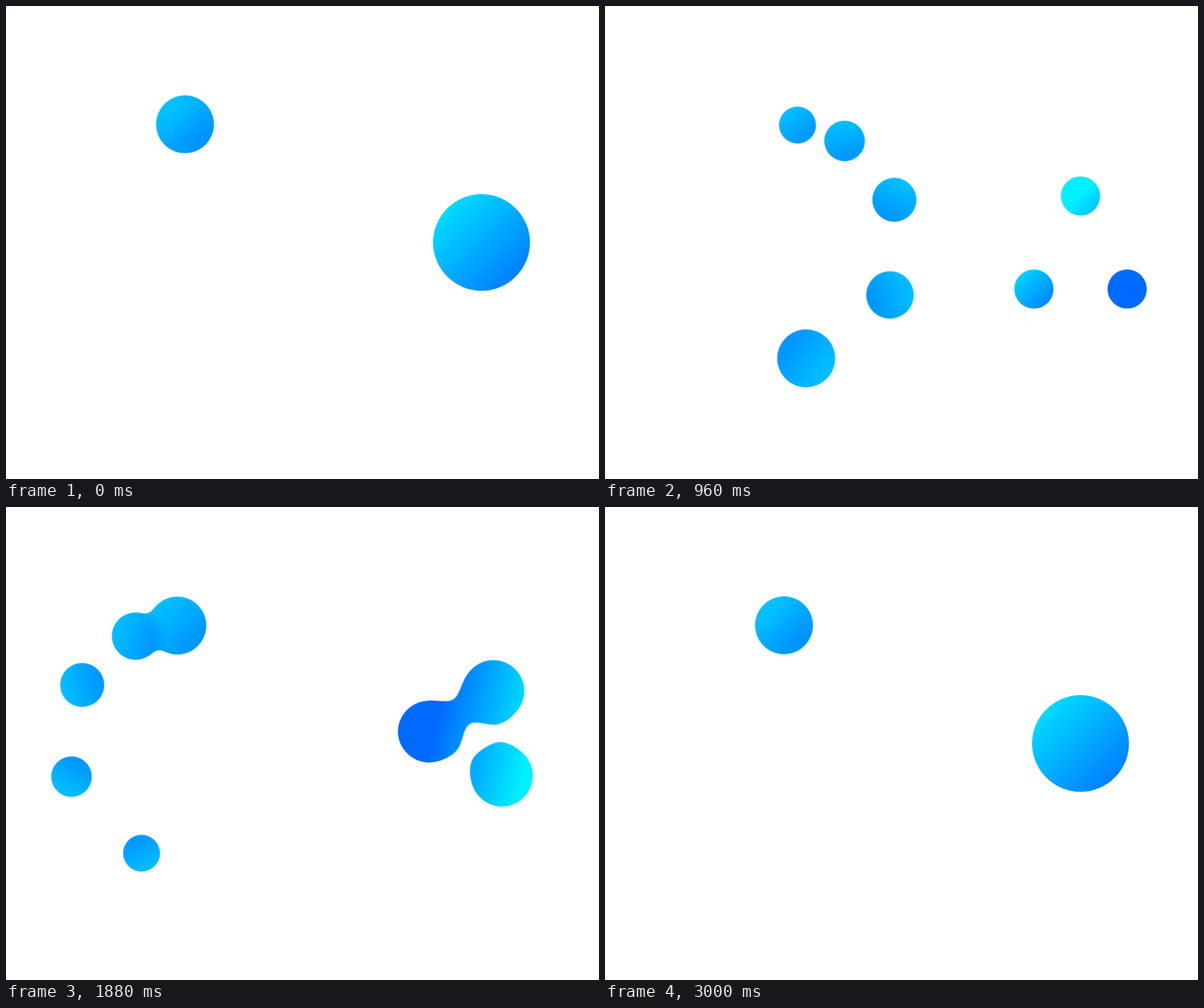
An HTML page that plays this animation: 837 px wide and 669 px high, repeating every 3040 ms.

```html
<!DOCTYPE html>
<html lang="en">
<head>
<meta charset="utf-8">
<title>Gooey loaders</title>
<style>
  html, body { margin: 0; width: 100%; height: 100%; overflow: hidden; background: #fff; }
  svg { display: block; width: 837px; height: 669px; }
</style>
</head>
<body>
<svg viewBox="0 0 837 669">
  <defs>
    <linearGradient id="ballFill" x1="0" y1="0" x2="1" y2="1">
      <stop offset="0" stop-color="#00ceff"/>
      <stop offset="1" stop-color="#0086ff"/>
    </linearGradient>
    <linearGradient id="blobFill" gradientUnits="userSpaceOnUse" x1="-71" y1="-71" x2="71" y2="71">
      <stop offset="0" stop-color="#00f0ff"/>
      <stop offset="1" stop-color="#006aff"/>
    </linearGradient>
    <filter id="softGoo" filterUnits="userSpaceOnUse" x="0" y="0" width="837" height="669" color-interpolation-filters="sRGB">
      <feGaussianBlur stdDeviation="7"/>
      <feColorMatrix values="1 0 0 0 0  0 1 0 0 0  0 0 1 0 0  0 0 0 10 -4.5"/>
    </filter>
    <filter id="hardGoo" filterUnits="userSpaceOnUse" x="420" y="80" width="500" height="500" color-interpolation-filters="sRGB">
      <feGaussianBlur stdDeviation="20"/>
      <feColorMatrix values="1 0 0 0 0  0 1 0 0 0  0 0 1 0 0  0 0 0 40 -19.5"/>
    </filter>
    <mask id="blobMask" maskUnits="userSpaceOnUse" x="420" y="80" width="417" height="500">
      <g filter="url(#hardGoo)">
        <g id="blobs" fill="#fff"><circle/><circle/><circle/></g>
      </g>
    </mask>
  </defs>

  <g id="balls" filter="url(#softGoo)" fill="url(#ballFill)">
    <circle r="41.5"/><circle r="34.2"/><circle r="31.8"/><circle r="29.4"/><circle r="26.9"/>
  </g>

  <g mask="url(#blobMask)">
    <rect id="paint" x="-500" y="-500" width="1000" height="1000" fill="url(#blobFill)"/>
  </g>
</svg>
<script>
  const LOOP = 3040, STEP = 40;
  const ORBIT = 167, BALL_DELAY = 200, TURN = 2000, SPLIT = 1000;
  const FULL_RADIUS = 70.9;

  // [time, value] knots of the three-part blob
  const radiusKnots = [[1000, 34.3], [1280, 37.5], [1640, 44], [2120, 52], [2400, 57.5], [2800, 68], [3000, 70.9]];
  const spreadKnots = [[1000, 65.9], [1280, 68], [1640, 63.3], [2120, 42], [2400, 24], [2800, 3], [3000, 0]];
  const corners = [[0, -1], [-1, 1], [1, 1]];

  const balls = [...document.querySelectorAll('#balls circle')];
  const blobs = document.getElementById('blobs');
  const paint = document.getElementById('paint');

  function smooth(x) {
    x = Math.min(1, Math.max(0, x));
    return x * x * (3 - 2 * x);
  }

  // Cubic Hermite curve through the knots, flat at both ends
  function curve(knots, t) {
    const last = knots.length - 1;
    if (t >= knots[last][0]) return knots[last][1];
    const slope = i => i === 0 || i === last ? 0 :
      (knots[i + 1][1] - knots[i - 1][1]) / (knots[i + 1][0] - knots[i - 1][0]);
    const i = knots.findIndex((k, n) => n < last && t < knots[n + 1][0]);
    const [t0, a] = knots[i], [t1, b] = knots[i + 1];
    const span = t1 - t0, u = (t - t0) / span, v = 1 - u;
    return a * v * v * (1 + 2 * u) + b * u * u * (3 - 2 * u)
      + span * u * v * (slope(i) * v - slope(i + 1) * u);
  }

  function blobPose(t) {
    if (t >= SPLIT) return [curve(radiusKnots, t), curve(spreadKnots, t)];
    const q = smooth(t / SPLIT);
    return [FULL_RADIUS - 36.6 * q, 131.6 * q * (1 - q / 2)];
  }

  function draw(t) {
    balls.forEach((ball, i) => {
      const angle = 360 * smooth((t - i * BALL_DELAY) / TURN);
      ball.setAttribute('transform', `translate(252.7 334.3) rotate(${angle}) translate(0 ${-ORBIT})`);
    });

    const [radius, spread] = blobPose(t);
    const place = `translate(671.2 334.5) rotate(${360 * smooth((t - SPLIT) / TURN)})`;
    blobs.setAttribute('transform', place);
    corners.forEach(([x, y], i) => {
      const blob = blobs.children[i];
      blob.setAttribute('cx', x * spread);
      blob.setAttribute('cy', y * spread);
      blob.setAttribute('r', radius);
    });
    paint.setAttribute('transform', `${place} scale(${radius / FULL_RADIUS})`);
  }

  const start = performance.now();
  function tick() {
    const t = (performance.now() - start) % LOOP;
    draw(Math.floor(t / STEP) * STEP);
    requestAnimationFrame(tick);
  }
  tick();
</script>
</body>
</html>
```
